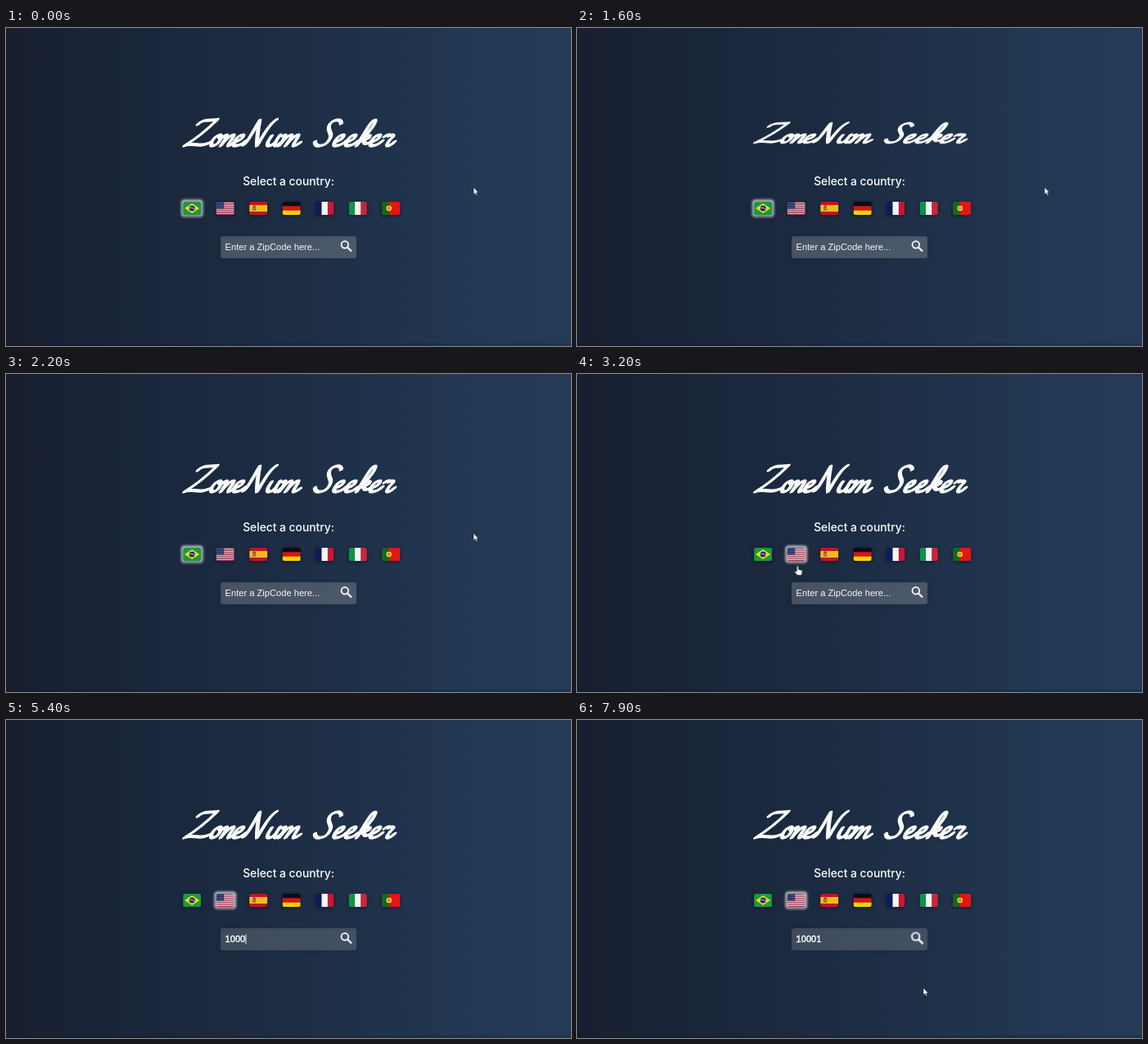
Animation, 690 px wide and 388 px high, one loop 8000 ms. Source, as an HTML page:

```html
<!DOCTYPE html>
<html lang="en">
<head>
<meta charset="utf-8">
<title>ZoneNum Seeker</title>
<style>
html, body { margin: 0; width: 100%; height: 100%; overflow: hidden; background: #1c2b42; }
svg { position: absolute; inset: 0; width: 100%; height: 100%; }

/* One shared 8 s timeline: 1% = 80 ms */
.title, .pointer, .icon { animation: 8s linear infinite; }
.glow, .arrow, .hand, .beam, .hint, .digits, .caret, .field { animation: 8s step-end infinite; }

.title {
  transform-origin: 50% 33%;
  fill: none; stroke: #fafbfb; stroke-width: 3.4;
  stroke-linecap: round; stroke-linejoin: round;
  animation-name: flip;
}
@keyframes flip {
  0%, 13% { transform: rotateX(0deg); animation-timing-function: ease; }
  24.7%, 100% { transform: rotateX(360deg); }
}

.label { font: 500 13.8px Inter, "Open Sans", sans-serif; fill: #fff; text-anchor: middle; }
.hint, .digits { font: 11.15px "Liberation Sans", Arial, sans-serif; fill: #f6f7f9; }
.digits { fill: #fff; stroke: #fff; stroke-width: .4; }

.glow { fill: #fff; filter: blur(1.6px); }
.first { animation-name: leave; }
.second { animation-name: arrive; }
@keyframes leave { 0% { opacity: .8; } 38.75%, 100% { opacity: 0; } }
@keyframes arrive { 0% { opacity: 0; } 38.75%, 100% { opacity: .8; } }

.field { fill: #fff; animation-name: focus; }
@keyframes focus { 0% { fill-opacity: .16; } 45%, 100% { fill-opacity: .13; } }
.hint { animation-name: hint; }
@keyframes hint { 0% { opacity: 1; } 56.25%, 100% { opacity: 0; } }
.digits { animation-name: type; }
@keyframes type {
  0% { clip-path: inset(0 100% 0 0); }
  56.25% { clip-path: inset(0 80% 0 0); }
  60% { clip-path: inset(0 60% 0 0); }
  63.75% { clip-path: inset(0 40% 0 0); }
  67.5% { clip-path: inset(0 20% 0 0); }
  70%, 100% { clip-path: inset(0 -5% 0 0); }
}
.caret { fill: #fff; animation-name: blink, advance; }
@keyframes blink {
  0%, 53.75%, 76.25%, 88.75%, 100% { opacity: 0; }
  46.25%, 56.25%, 82.5% { opacity: 1; }
}
@keyframes advance {
  0% { transform: translateX(0); }
  56.25% { transform: translateX(6.2px); }
  60% { transform: translateX(12.4px); }
  63.75% { transform: translateX(18.6px); }
  67.5% { transform: translateX(24.8px); }
  70%, 100% { transform: translateX(31px); }
}

.icon { fill: none; stroke: #fff; stroke-width: 1.75; transform-origin: 416px 266px; animation-name: grow; }
@keyframes grow {
  0%, 88.5% { transform: scale(1); }
  90%, 100% { transform: scale(1.08); }
}

.pointer { fill: #fff; stroke: #10151f; stroke-width: .5; animation-name: travel; }
@keyframes travel {
  0%, 34.5% { transform: translate(571px, 194.5px); animation-timing-function: ease-in-out; }
  38%, 38.75% { transform: translate(270px, 222px); }
  40%, 41% { transform: translate(269.5px, 234px); }
  42.5%, 82% { transform: translate(269px, 267px); }
  82.5% { transform: translate(285px, 267px); animation-timing-function: ease-in-out; }
  88.5%, 90.5% { transform: translate(416px, 267px); animation-timing-function: ease-in-out; }
  93% { transform: translate(424px, 309px); animation-timing-function: ease-out; }
  98.5%, 100% { transform: translate(423px, 327px); }
}
.arrow { animation-name: arrow; }
.hand { animation-name: hand; }
.beam { stroke: #eef1f4; stroke-width: .9; animation-name: beam; }
@keyframes arrow { 0%, 91.25%, 100% { opacity: 1; } 37.5% { opacity: 0; } }
@keyframes hand { 0%, 42.5%, 91.25%, 100% { opacity: 0; } 37.5%, 87.5% { opacity: 1; } }
@keyframes beam { 0%, 46.25%, 87.5%, 100% { opacity: 0; } 42.5%, 82.5% { opacity: 1; } }
</style>
</head>
<body>
<svg viewBox="0 0 690 388">
  <defs>
    <linearGradient id="sky">
      <stop offset="0" stop-color="#191e30"/>
      <stop offset=".1" stop-color="#182235"/>
      <stop offset=".5" stop-color="#1d2d44"/>
      <stop offset=".8" stop-color="#223751"/>
      <stop offset="1" stop-color="#253b55"/>
    </linearGradient>
    <clipPath id="round"><rect width="22" height="16" rx="2.5"/></clipPath>
    <filter id="soft" x="-20%" y="-40%" width="140%" height="190%">
      <feDropShadow dx="0" dy="1" stdDeviation="2" flood-color="#0a101c" flood-opacity=".6"/>
    </filter>
  </defs>
  <rect width="690" height="388" fill="url(#sky)"/>
  <rect y="385" width="690" height="3" fill="#10131f" opacity=".2"/>

  <text class="label" x="345" y="191.5">Select a country:</text>

  <rect class="glow first" x="214" y="209.5" width="26.5" height="21" rx="4"/>
  <rect class="glow second" x="254.5" y="209.5" width="26.5" height="21" rx="4"/>
  <g id="flags" filter="url(#soft)"></g>

  <g filter="url(#soft)"><rect class="field" x="262" y="254" width="166" height="27" rx="3"/></g>
  <text class="hint" x="267.5" y="271">Enter a ZipCode here...</text>
  <text class="digits" x="267.5" y="271">10001</text>
  <rect class="caret" x="267.5" y="261.5" width="1" height="12"/>
  <g class="icon"><circle cx="413.8" cy="264.3" r="4.3"/><path d="M417 267.5L422 272.5" stroke-width="2.2"/></g>
</svg>

<svg class="title" viewBox="0 0 690 388" role="img" aria-label="ZoneNum Seeker">
  <g id="script" transform="translate(217 144) skewX(-24) scale(.965 1)"></g>
</svg>

<svg viewBox="0 0 690 388">
  <g class="pointer">
    <path class="arrow" d="M0 0V8.5L2 6.7 3.3 9.8 4.7 9.2 3.4 6.3H6Z"/>
    <path class="hand" d="M-1 1Q0 -.8 1 1V4.5L5 5.5Q6 6 5.5 8L4.5 11.5H-.5L-3.5 7.5Q-3.5 6 -1 7Z"/>
    <path class="beam" d="M-2 -6H2M0 -6V6M-2 6H2"/>
  </g>
</svg>

<script>
const rect = (x, y, w, h, fill) => `<rect x="${x}" y="${y}" width="${w}" height="${h}" fill="${fill}"/>`;
const disc = (x, y, r, fill) => `<circle cx="${x}" cy="${y}" r="${r}" fill="${fill}"/>`;
const columns = (...colors) => colors.map((c, i) => rect(i * 22 / 3, 0, 7.4, 16, c)).join('');
const rows = (...colors) => colors.map((c, i) => rect(0, i * 16 / colors.length, 22, 16 / colors.length + .05, c)).join('');

const stripes = rows(...Array.from({ length: 13 }, (_, i) => i % 2 ? '#dcdadf' : '#a83548'));
const stars = Array.from({ length: 12 }, (_, i) => disc(1.3 + i % 4 * 2.2, 1.5 + Math.floor(i / 4) * 2.7, .45, '#b9bfd6')).join('');

const flags = [
  rect(0, 0, 22, 16, '#189b3c') + '<path d="M2 8L11 2L20 8L11 14Z" fill="#fbdc16"/>' + disc(11, 8, 3.6, '#19347c')
    + '<path d="M7.6 7.3Q11 6.5 14.3 9.2" fill="none" stroke="#e6eef2" stroke-width=".7"/>',
  stripes + rect(0, 0, 9.5, 8.6, '#2b3568') + stars,
  rows('#bd1624', '#efbb1c', '#efbb1c', '#bd1624') + rect(4, 5.5, 4, 5, '#a3582a') + disc(6, 5.2, 1.2, '#9b4527') + rect(5.2, 7, 1.6, 2, '#c99a72'),
  rows('#0b0b0d', '#d51212', '#fbd00d'),
  columns('#0a1f54', '#f5f5f7', '#cc1836'),
  columns('#119447', '#f5f5f5', '#cc2838'),
  rect(0, 0, 22, 16, '#e21212') + rect(0, 0, 8.5, 16, '#116a20') + disc(8.5, 8, 3.3, '#f5df24') + disc(8.5, 8, 1.8, '#d92a22') + disc(8.5, 8, .8, '#fff')
];
document.getElementById('flags').innerHTML = flags
  .map((art, i) => `<g transform="translate(${216.2 + i * 40.5} 212)" clip-path="url(#round)">${art}</g>`).join('');

// Brush letters: advance width and pen stroke, baseline at zero
const glyphs = {
  Z: [31, 'M5 -26C8 -33 17 -30 27 -32C20 -20 10 -8 0 0C10 -5 19 3 31 -4'],
  N: [29, 'M-1 -1C3 -2 4 -20 6 -31C9 -20 13 -8 17 0C19 -12 20 -26 27 -32'],
  S: [24, 'M23 -27C20 -34 8 -32 9 -24C10 -17 19 -15 17 -7C15 2 3 2 0 -5'],
  o: [14, 'M8 -13C1 -13 -1 0 5 0C12 0 13 -13 7 -13C8 -9 12 -9 14 -11'],
  n: [15, 'M0 -12C2 -14 4 -13 3 -9L1 0C4 -8 8 -14 11 -13C14 -12 8 -1 11 0C13 0 14 -2 16 -4'],
  e: [15, 'M1 -5C8 -5 12 -13 7 -13C1 -13 -2 0 5 0C9 0 13 -3 15 -6'],
  u: [15, 'M1 -12C-1 -5 -1 0 4 0C8 0 10 -6 11 -13C9 -5 9 0 12 0C14 0 15 -2 16 -4'],
  m: [25, 'M0 -12C2 -14 4 -13 3 -9L1 0C4 -8 7 -14 10 -13C13 -12 10 -4 9 0C12 -8 16 -14 19 -13C22 -12 16 -1 20 0C22 0 24 -2 26 -4'],
  k: [16, 'M2 -4C10 -16 14 -31 9 -31C5 -31 3 -8 1 0C3 -8 8 -14 12 -12C14 -9 8 -7 5 -7C9 -6 9 0 16 -4'],
  r: [15, 'M0 -11C3 -15 5 -13 5 -12C8 -14 11 -13 11 -11C8 -7 6 0 10 0C12 0 14 -2 16 -5'],
  ' ': [19, '']
};
let pen = 0;
const strokes = [...'ZoneNum Seeker'].map(letter => {
  const [advance, d] = glyphs[letter];
  const path = `<path transform="translate(${pen})" d="${d}"/>`;
  pen += advance;
  return path;
}).join('');
// A second pass, slightly shifted, gives the broad nib
document.getElementById('script').innerHTML = strokes + `<g transform="translate(1.4 -.7)">${strokes}</g>`;
</script>
</body>
</html>
```
